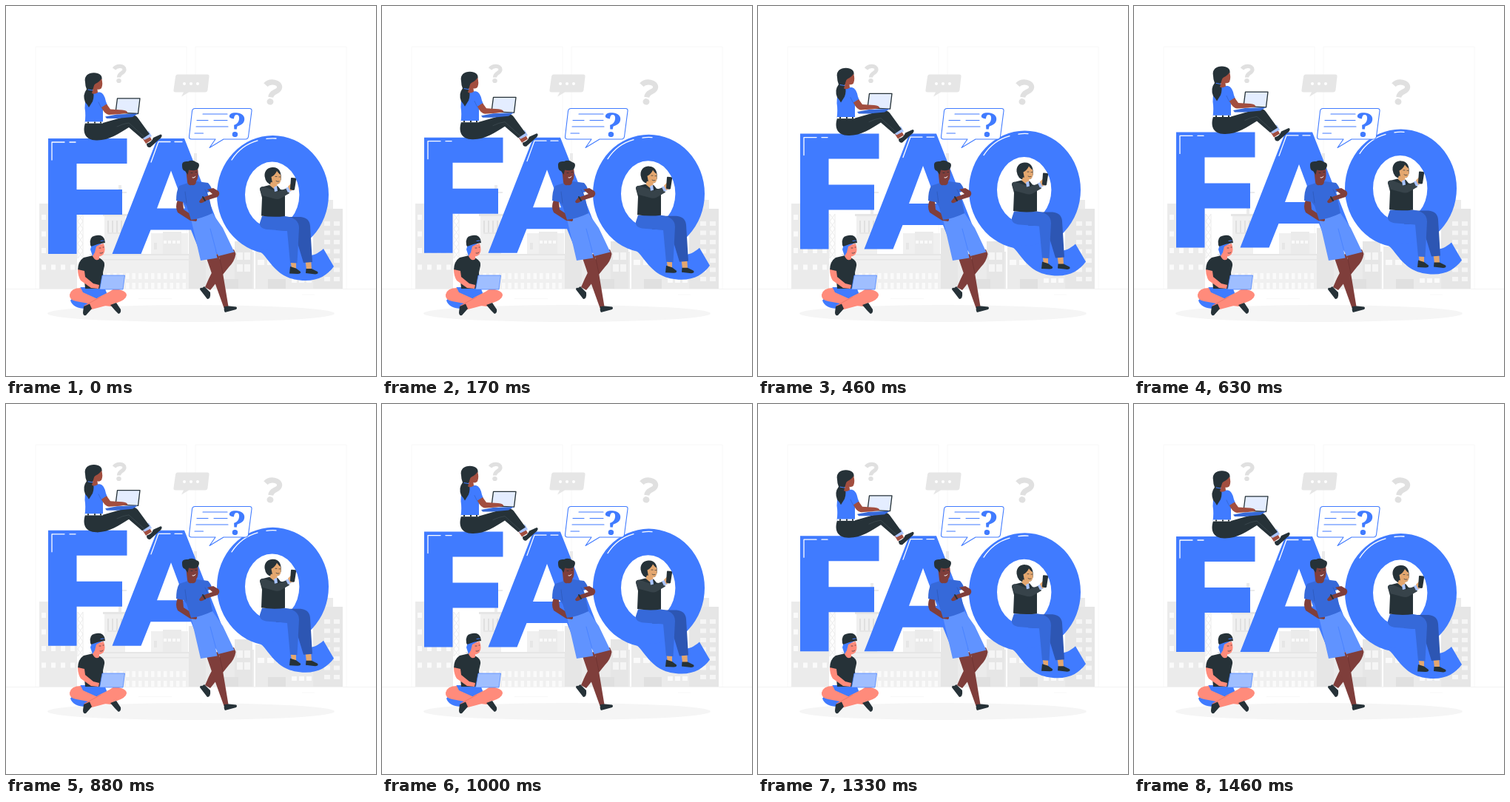
Animation of 500 by 500 pixels, one loop 1.5 s. Source, as an HTML page:

```html
<!DOCTYPE html>
<html lang="en">
<head>
<meta charset="utf-8">
<title>FAQ</title>
<style>
  html, body { margin: 0; width: 100%; height: 100%; overflow: hidden; background: #fff; }
  svg { display: block; width: 100%; height: 100%; }
  .blue { fill: #407bff; }
  .dark { fill: #263238; }
  .line { fill: none; stroke-linecap: round; stroke-linejoin: round; }
</style>
</head>
<body>
<svg viewBox="0 0 500 500">
  <defs>
    <g id="ask">
      <path class="line" style="stroke-linecap:butt" stroke="#e0e0e0" stroke-width="5.2" d="M-7.500-6C-4-11 6.500-11 6.500-5C6.500 0-1-1-1 5.500"/>
      <ellipse cx="-1" cy="10" rx="3.300" ry="3.100" fill="#e0e0e0"/>
    </g>
  </defs>

  <!-- backdrop -->
  <g fill="none" stroke="#f7f7f7" stroke-width=".8">
    <path d="M40 382V55H244V382M256 382V55H460V382"/>
    <path stroke="#f0f0f0" d="M0 382.500H500"/>
    <path d="M179 395.500H224M400 390H417"/>
  </g>
  <g id="city"></g>
  <ellipse cx="250" cy="415.500" rx="194" ry="11.500" fill="#f5f5f5"/>
  <use href="#ask" transform="translate(153.500 91)"/>
  <use href="#ask" transform="translate(360 116) rotate(7) scale(1.36)"/>
  <path fill="#e6e6e6" d="M232 92.500H272Q275 92.500 274.500 95.500L272.500 113.500Q272 116.500 269 116.500H247L237 122.500L240 116.500H229Q226 116.500 226.500 113.500L229 95.500Q229.500 92.500 232 92.500Z"/>
  <g fill="#fff"><circle cx="241" cy="105" r="2"/><circle cx="250" cy="105" r="2"/><circle cx="259" cy="105" r="2"/></g>

  <g id="floating">
    <!-- letters -->
    <g class="blue">
      <path d="M57 179H163.500V213H95.500V248H157V282H95.500V335H57Z"/>
      <path fill-rule="evenodd" d="M204.500 179H241L302.500 335H263L250 302.500H195.500L182.500 335H143.500ZM223 222.500L204 273.500H242Z"/>
      <path fill-rule="evenodd" d="M285 255A75.500 80 0 0 1 436 255A75.500 80 0 0 1 285 255ZM323 255A36.700 44.500 0 0 0 396.400 255A36.700 44.500 0 0 0 323 255Z"/>
      <path d="M338 329C356 335 360 371 405 371C423 371 435 363 443 352L429 328C421 335 415 337 411 337C406 337 402 332 399 322L370 330Z"/>
    </g>
    <path class="line" stroke="#fff" stroke-width="1.300" d="M62 208V184H79M86 184H94M196 211L206 183.500H222M228 183.500H238M305 208Q318 188 340 182M352 179.500Q358 178.500 365 179"/>

    <!-- woman with laptop -->
    <path fill="#a24e3f" d="M182 175L191 170L197 181L189 186Z"/>
    <path fill="#a9c4ff" d="M182 175L193 169L197 176L187 181Z"/>
    <path class="dark" d="M190 186Q197 184 199 178L209 173.500Q212 174 209.500 178L195 191Q190 192 190 186Z"/>
    <path class="dark" d="M107 158C103 171 107 181 122 181.500C139 182 153 172 166 164L184 179.500L194 173L178 151C173 145 166 147 159 150L131 158Z"/>
    <path class="line" stroke="#45525a" stroke-width=".6" d="M150 163Q158 159 166 158L187 177"/>
    <path class="blue" d="M116 116.500L127 116.500Q133 118 135 129L137 134L131 139L131 158H106.500Q108 147 106.500 138Q106 123 116 116.500Z"/>
    <path class="line" stroke="#3669d9" d="M125 130Q128 137 130 139"/>
    <path stroke="#fff" stroke-width="2.200" d="M106.500 157.500H131"/>
    <path stroke="#263238" stroke-width="2.200" d="M110 157.500H112M119 157.500H121M127 157.500H129"/>
    <path fill="#e4edff" stroke="#263238" stroke-width="1.300" stroke-linejoin="round" d="M150.500 124.800H181L178.500 145.500L148 144Z"/>
    <path fill="#3669d9" d="M134 149.500L150 146.500L178 145.500L171 150L150 152H136Z"/>
    <path fill="#a24e3f" d="M129 137L136 132.500L141 139.500L157 140.500Q164 141 164.500 144.500L154 146L139 147Q133 146 129 137Z"/>
    <path class="dark" d="M107 103C105 94 112 90 119 90.200C126 90.200 130.500 94 129.500 99L124 110L117 113Q120 121 117 129L112 137Q110 133 107 130Q103 120 109 112.500Q107 108 107 103Z"/>
    <path fill="#a24e3f" d="M121 105Q127 102 129 98Q131.500 105 129 111Q127 113.500 123.500 112.500L124 117Q120 120 116 118L118.500 109Q119 106 121 105Z"/>
    <path class="line" stroke="#407bff" stroke-width="1" d="M111 113L117 114"/>

    <!-- woman with phone -->
    <path fill="#e4a76f" d="M384 341H392L392 355H386ZM404 340H412L413 356H406Z"/>
    <path class="dark" d="M384 352L392 354.500L398 359Q399 362 394 362L383 361.500ZM405.500 355L413 355L421 359Q423 362 418 362.500L405 361Z"/>
    <path fill="#2d56b3" d="M365 285L398 285Q410 286 411 297L414 346L402 347L389 304L365 303Z"/>
    <path fill="#3669d9" d="M346 284H377Q396 286 396 300L393.500 347.500L384 347L380 304L354 302Q342 301 343 293Z"/>
    <path class="dark" d="M349.500 230C349 221 356 217.500 361 218C369 218 373 225 371.500 235L369 240L360 241.500Q351 241 349.500 230Z"/>
    <path fill="#e4a76f" d="M358 238L366 239L367 247L360 250L355 246Z"/>
    <path class="dark" d="M343 248Q343 244 348 244L356 242L362 247L367 243L371 248L377 249V284Q361 286 345 283.500L346 259Z"/>
    <path fill="#37434a" d="M343 247Q344 243 351 245L367 251L380 246L383 253L371 260Q367 262 361 260L346 256Z"/>
    <path fill="#a9c4ff" d="M362 245L366 243L367 250L363 251ZM378 246L384 243.500L386 250L381 252Z"/>
    <path fill="#e4a76f" d="M381 244L385 240L390 242L389 248L384 250Z"/>
    <path class="dark" d="M386 232L391 232.500Q392.500 233 392 235L390 248Q389.500 249 388 249L384.500 248Q383.500 248 384 246.500L385 233Q385 232 386 232Z"/>
    <path fill="#e4a76f" d="M358.500 231Q364 228 366 223Q368 226 371 228Q372.500 235 370 239Q366 243 360 239Z"/>
    <path class="line" stroke="#263238" stroke-width=".7" d="M364 230.500H366M369 231H370.500M365 236.500Q367 238 369 237"/>
  </g>

  <!-- speech bubble -->
  <g class="line" stroke="#407bff" stroke-width="1.100">
    <path fill="#fff" d="M255.500 138.500H329Q332.500 138.500 332 142L327.500 176.500Q327 180 323.500 180H294L275 191.500L283 180H251Q247 180 247.500 176.500L251.500 142Q252 138.500 255.500 138.500Z"/>
    <path d="M266 146H299M258 154.500H273M281 154.500H299M257 163H300M255 172H266.500"/>
  </g>
  <text class="blue" x="299.500" y="177" font-family="'Noto Serif','Liberation Serif',serif" font-weight="700" font-size="45" transform="rotate(4 312 160)">?</text>

  <!-- leaning man -->
  <g fill="#7f3e3b">
    <path d="M286 334L308 329L310.500 335Q309 345 301 353L276 384L269 380Q278 358 289 342Z"/>
    <path d="M270 338L287 335L292 355L300.500 406L294.500 408L283 376Z"/>
  </g>
  <path class="line" stroke="#6b3230" stroke-width=".7" d="M289 342L293 361"/>
  <path class="dark" d="M268 379L276 387Q277 396 272 396L262 383Q262 380 265 381ZM295 406L301 405.500L311 406.500Q313 408 311 410L296 414Q294 411 295 406Z"/>
  <path fill="#6093ff" d="M250 288L279 280L293 300L308.500 332.500L287 338L283 329L285.500 340.500L263 344Z"/>
  <path class="line" stroke="#407bff" stroke-width=".7" d="M276 301L284 331"/>
  <path fill="#7f3e3b" d="M232 262L239 264L240 275L255 285Q260 288 257 291L249 290L232 279Q228 272 232 262Z"/>
  <path fill="#3669d9" d="M234 243L246 239L258 237L273 239Q277 243 279 250L272 252L275 261L279 280Q265 287 250 289L244 270L240 265L230 263Q230 250 234 243Z"/>
  <path class="line" stroke="#2d56b3" stroke-width=".7" d="M242 251L244 266M269 248L272 254"/>
  <path fill="#7f3e3b" d="M272 248L280 246L287 250Q290 254 286 258L270 263Q262 269 261 264L265 259L279 254Z"/>
  <path class="line" stroke="#263238" stroke-width="2" d="M266 258L269 263"/>
  <path fill="#7f3e3b" d="M243 220L259 218Q261 232 257 237Q257 243 251 242Q246 243 245 238Z"/>
  <path class="dark" d="M238 216Q237 209 246 210Q252 207 257 211Q263 212 260 219Q257 224 247 221.500L245.500 228L242 223Q238 222 238 216Z"/>
  <path class="line" stroke="#fff" stroke-width="1" d="M252 232Q254 233 256 230.500"/>
  <path class="line" stroke="#263238" stroke-width=".8" d="M250 225.500H252M256 224.500H257.500"/>

  <!-- seated boy -->
  <path class="blue" d="M101 380H133L137 390L122 398L108 409Q91 409 87 398Z"/>
  <path fill="#ff8b7b" d="M101 381Q88 381 86 390Q85 397 95 399L122 404L142 406L148 400L124 396L104 387Z"/>
  <path fill="#ff8b7b" d="M146 382Q163 384 163 391Q162 397 150 401L116 410L107 411L106 405L126 393L140 386Z"/>
  <path class="line" stroke="#e56e61" stroke-width=".7" d="M106 405L128 393"/>
  <path class="dark" d="M105 406L113 402.500L116 409L108 418Q104 419 104 414ZM141 404L149 401L155 410Q156 415 152 416L147 411Z"/>
  <path class="dark" d="M105 340L118 337L127 341Q134 345 133 351L131 360L132 378L126 382H107L105 360L97 357Q97 345 105 340Z"/>
  <path fill="#ff8b7b" d="M97 356L106 358L107 366L118 375L126 377L125 382L115 381L101 371Q97 365 97 356Z"/>
  <path fill="#9fbeff" stroke="#407bff" stroke-width=".7" stroke-linejoin="round" d="M130 364H160.500L158 383H126.500Z"/>
  <path fill="#ff8b7b" d="M119 324L132 321Q135 330 132 335Q129 339 126 338V342Q121 346 117 338Z"/>
  <path class="blue" d="M116 322L131 320L122 325L120 333L117 338L114 329Z"/>
  <path class="dark" d="M114 323Q112 312 120 310.500Q130 308 133 315L134 320Q124 321 115 325Z"/>
  <path class="line" stroke="#407bff" stroke-width="1" d="M128 317.500L132 317"/>
  <path class="line" stroke="#263238" stroke-width=".7" d="M126 327H128M131 326H132M127 334Q129 335 131 333"/>
</svg>
<script>
  const RISE = 9, LOOP = 1500, LEAD = 20;

  const city = [];
  const box = (x, y, w, h, fill = '#e6e6e6') =>
    city.push(`<rect x="${x}" y="${y}" width="${w}" height="${h}" fill="${fill}"/>`);
  const windows = (x, y, cols, rows, dx, dy, w, h, fill = '#fafafa') => {
    for (let r = 0; r < rows; r++)
      for (let c = 0; c < cols; c++) box(x + c * dx, y + r * dy, w, h, fill);
  };

  // left block and crane
  box(45, 267, 51, 115, '#ebebeb');
  windows(48, 282, 4, 4, 13, 22.5, 6, 7);
  for (let y = 281; y < 335; y += 10)
    city.push(`<path d="M97 ${y}L104 ${y + 10}M104 ${y}L97 ${y + 10}M97 ${y}V${y + 10}M104 ${y}V${y + 10}" stroke="#ebebeb" fill="none"/>`);
  // colonnade hall
  box(133, 281, 28, 54, '#f0f0f0');
  box(131, 281, 34, 3);
  box(139, 251, 24, 2, '#ebebeb');
  box(152, 242, 4, 39, '#ebebeb');
  windows(137, 290, 4, 1, 6, 1, 2, 16, '#e0e0e0');
  box(137, 306, 22, 2);
  box(115, 335, 133, 47, '#f0f0f0');
  box(113, 335, 135, 2, '#e6e6e6');
  box(115, 342, 132, 1.5, '#e6e6e6');
  windows(128, 361, 14, 1, 8.5, 1, 4.5, 8);
  windows(128, 374, 14, 1, 8.5, 1, 4.5, 8);
  // dome behind the middle letter
  box(196, 307, 50, 28, '#f0f0f0');
  box(212, 305, 25, 30, '#ebebeb');
  windows(213, 317, 4, 1, 6, 1, 4, 4);
  box(200, 320, 4, 9);
  box(254, 199, 4, 40, '#ebebeb');
  // right-hand blocks
  box(247, 300, 24, 82);
  box(270, 332, 65, 50, '#ebebeb');
  box(309, 318, 24, 64);
  windows(312, 333, 2, 2, 10, 16, 8, 10, '#f5f5f5');
  box(294, 369, 20, 13, '#e0e0e0');
  box(337, 325, 45, 57, '#ebebeb');
  windows(340, 343, 3, 1, 13, 1, 9, 7);
  box(354, 369, 24, 13, '#e0e0e0');
  box(382, 340, 34, 42, '#ebebeb');
  windows(386, 368, 3, 1, 10, 1, 7, 6);
  box(415, 274, 40, 108);
  box(428, 262, 14, 12, '#ebebeb');
  windows(430, 291, 2, 7, 13, 12.5, 8, 6, '#f5f5f5');
  document.getElementById('city').innerHTML = city.join('');

  const floating = document.getElementById('floating');
  function draw() {
    const phase = (performance.now() + LEAD) % LOOP / LOOP;
    const lift = RISE * (1 - Math.cos(2 * Math.PI * phase)) / 2;
    floating.setAttribute('transform', `translate(0 ${-lift.toFixed(2)})`);
    requestAnimationFrame(draw);
  }
  draw();
</script>
</body>
</html>
```
